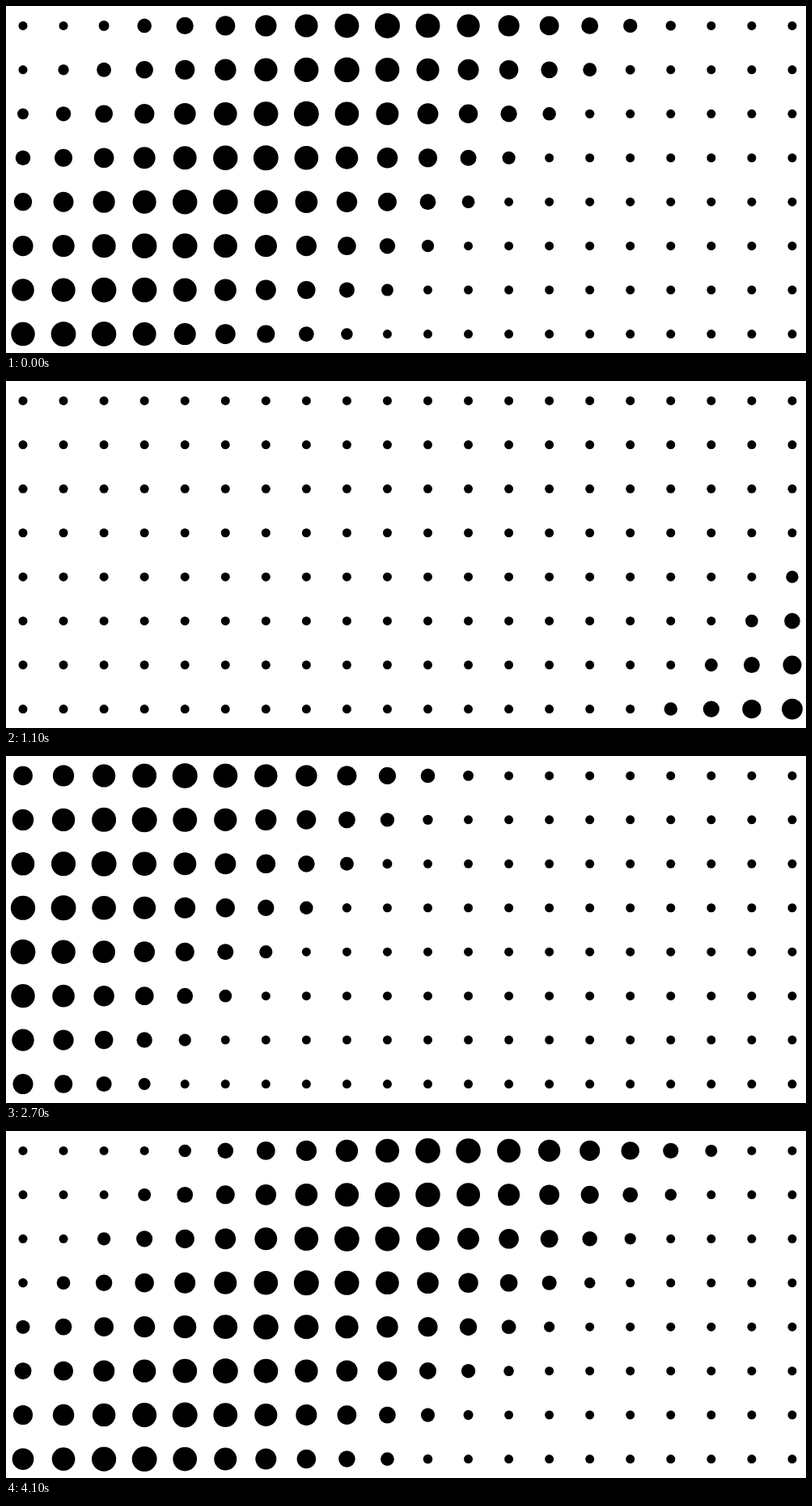
Animation of 989x429 px, one loop 4.2 s. Source, as an HTML page with a canvas:

```html
<!DOCTYPE html>
<html lang="en">
<head>
<meta charset="utf-8">
<title>Dot wave</title>
<style>
  html, body { margin: 0; width: 100%; height: 100%; overflow: hidden; background: #fff; }
  canvas { display: block; }
</style>
</head>
<body>
<canvas id="stage" width="989" height="429"></canvas>
<script>
const ctx = document.getElementById('stage').getContext('2d');
const COLS = 20, ROWS = 8, GAP_X = 50.05, GAP_Y = 54.45;
const LOOP = 4200, STEP = 100;
const SWEEP = 2011;              // ms for one pass of the wave
const LEFT = -6.05, RIGHT = 32.15; // crest limits on the top row, in columns
const PHASE = 0.393;             // share of the first pass already done at the start

// The crest runs back and forth at constant speed.
function crestAt(time) {
  const pass = (time / SWEEP + PHASE) % 2;
  return LEFT + (RIGHT - LEFT) * (1 - Math.abs(1 - pass));
}

// Dot area shrinks away from the crest, down to a smallest dot.
function radius(distance) {
  const area = 1 - (Math.abs(distance) / 8.05) ** 1.3;
  return Math.max(5.5, 15.5 * Math.sqrt(Math.max(0, area)));
}

function draw(time) {
  const crest = crestAt(Math.floor(time % LOOP / STEP) * STEP);
  ctx.clearRect(0, 0, 989, 429);
  for (let row = 0; row < ROWS; row++) {
    for (let col = 0; col < COLS; col++) {
      const diagonal = col + row * GAP_Y / GAP_X;
      ctx.beginPath();
      ctx.arc(21 + col * GAP_X, 24.4 + row * GAP_Y, radius(diagonal - crest), 0, 2 * Math.PI);
      ctx.fill();
    }
  }
}

const start = performance.now();
function tick() {
  draw(performance.now() - start);
  requestAnimationFrame(tick);
}
tick();
</script>
</body>
</html>
```
